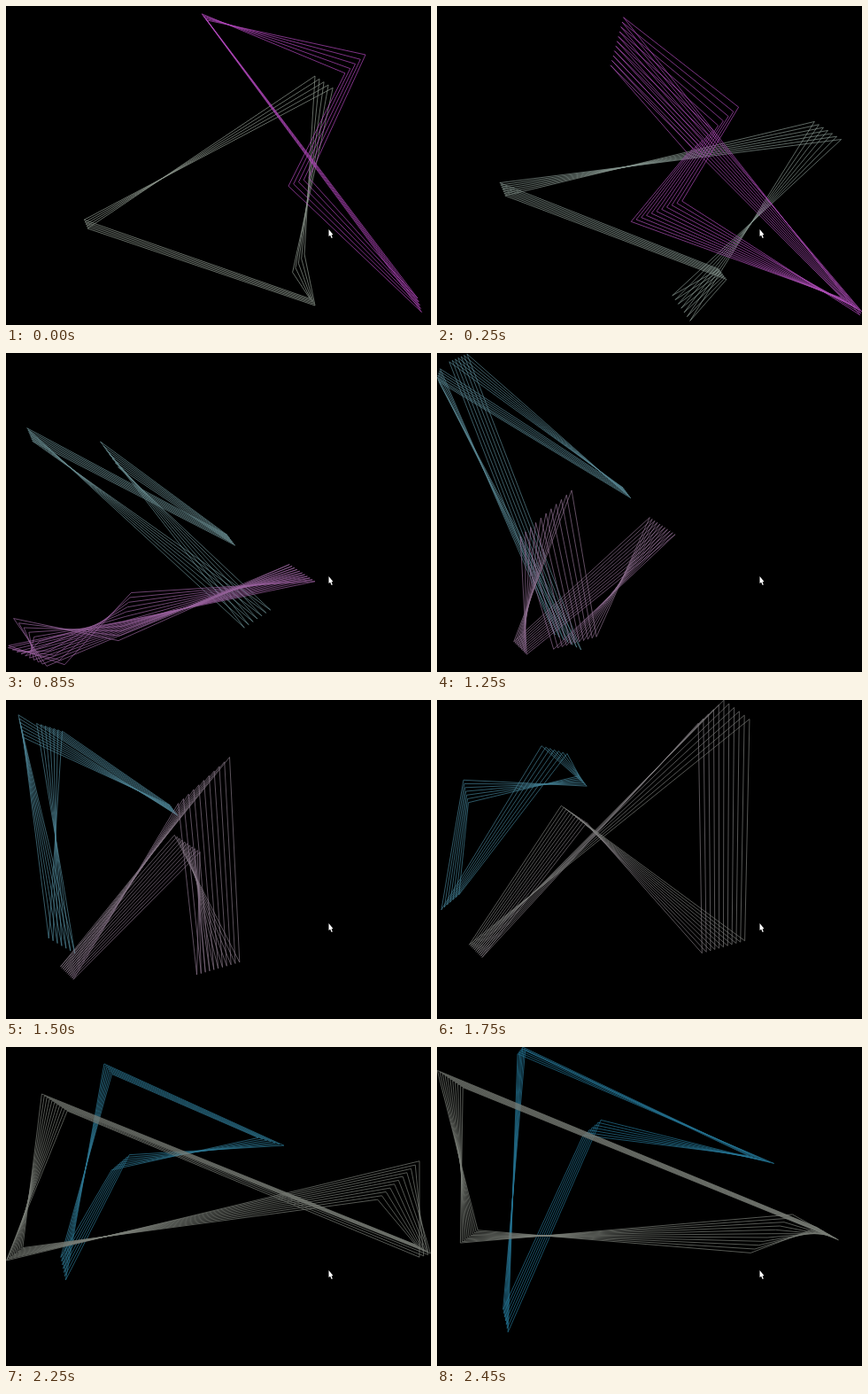
These frames come from a looping animation (480 by 360 pixels, 2500 ms). An HTML page with a canvas:

```html
<!DOCTYPE html>
<html lang="en">
<head>
<meta charset="utf-8">
<title>Bouncing polygons</title>
<style>
  html, body { margin: 0; width: 100%; height: 100%; overflow: hidden; background: #000; }
  canvas { display: block; width: 480px; height: 360px; }
</style>
</head>
<body>
<canvas id="stage" width="480" height="360"></canvas>
<script>
const ctx = document.getElementById('stage').getContext('2d');
const STEP_MS = 50, LOOP_STEPS = 50;
const WIDTH = 480, FLOOR = 357, START = -4;

const clamp01 = v => Math.min(1, Math.max(0, v));

// Position along one axis: each wall hit turns it round at the next speed
function axis(size, start, heading, ...speeds) {
  return tick => {
    let pos = start, dir = heading, left = tick - START;
    for (let hit = 0; ; hit++) {
      const speed = speeds[Math.min(hit, speeds.length - 1)];
      const wall = dir > 0 ? size : 0;
      const time = Math.abs(wall - pos) / speed;
      if (left <= time) return pos + dir * speed * left;
      left -= time;
      pos = wall;
      dir = -dir;
    }
  };
}
const across = (...path) => axis(WIDTH, ...path);
const down = (...path) => axis(FLOOR, ...path);

// Colour drifts from one tint to another over `fade` ticks
const shapes = [
  {
    trail: 6, from: [142, 152, 142], to: [36, 116, 148], fade: 176,
    corners: [
      { x: across(349, 1, 5.04, 4.9, 3.3), y: down(79, 1, 3.35, 2.83) },
      { x: across(92, -1, 0.99, 0.92), y: down(251, -1, 2.41, 4.24) },
      { x: across(349, -1, 1.433), y: down(338, -1, 1.92) },
      { x: across(337, -1, 3.34, 4.81), y: down(280, 1, 5.13, 4.76, 1.46) }
    ]
  },
  {
    trail: 10, from: [180, 72, 190], to: [122, 126, 120], fade: 130,
    corners: [
      { x: across(465, 1, 1.11, 2.88), y: down(330, 1, 3.86, 1.91) },
      { x: across(227, -1, 1.45, 1.96), y: down(16, -1, 1.78, 5.41, 1.43) },
      { x: across(406, -1, 5.76, 5.79, 4.72), y: down(55, 1, 5.21, 5.21, 4.34) },
      { x: across(342, -1, 5.75, 4.83, 2.38), y: down(194, 1, 2.31, 1.4) }
    ]
  }
];

// Steady pace, with a short hurry before the first second is over
const tickAt = step => 3.47 * step + 6 * clamp01((step - 11) / 6);

function outline(points) {
  ctx.beginPath();
  points.forEach(([x, y]) => ctx.lineTo(x, y));
  ctx.closePath();
}

function drawShape({ trail, from, to, fade, corners }, tick) {
  for (let age = trail; age >= 0; age--) {
    const k = tick - age;
    if (k < START) continue;
    const p = clamp01(k / fade);
    ctx.strokeStyle = `rgb(${from.map((v, i) => Math.round(v + (to[i] - v) * p))})`;
    outline(corners.map(({ x, y }) => [x(k), y(k)]));
    ctx.stroke();
  }
}

function drawPointer() {
  outline([[364.5, 252], [364.5, 260], [366.2, 258.8], [367.6, 262], [368.8, 261.4], [367.6, 258.4], [369.4, 258]]);
  ctx.fillStyle = '#fff';
  ctx.fill();
}

function draw() {
  const step = Math.floor(performance.now() / STEP_MS) % LOOP_STEPS;
  ctx.fillStyle = '#000';
  ctx.fillRect(0, 0, 480, 360);
  ctx.lineWidth = 0.7;
  shapes.forEach(shape => drawShape(shape, tickAt(step)));
  drawPointer();
  requestAnimationFrame(draw);
}
draw();
</script>
</body>
</html>
```
